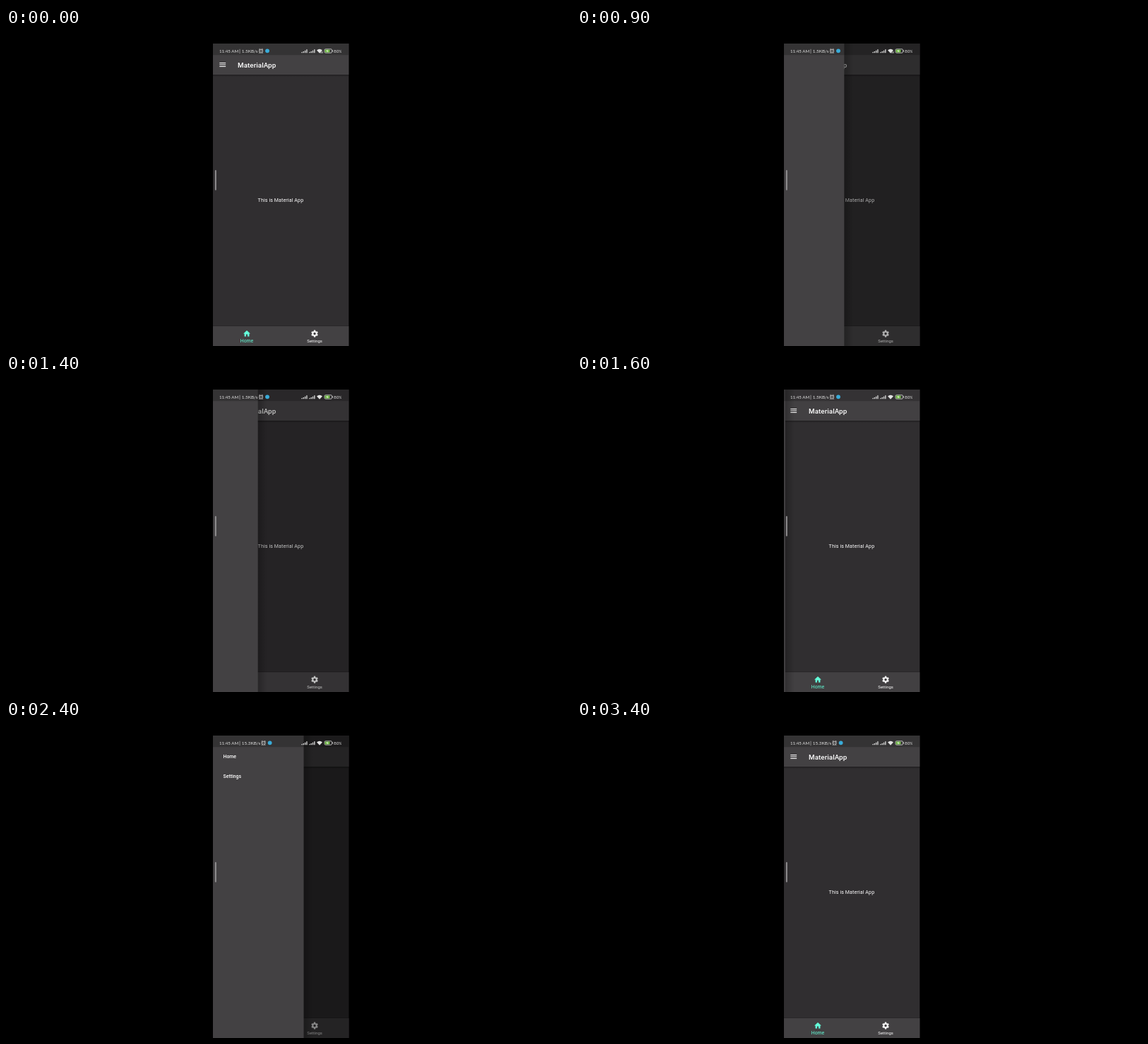
These frames come from a looping animation (800 by 450 pixels, 3500 ms). An HTML page:

```html
<!DOCTYPE html>
<html lang="en">
<head>
<meta charset="utf-8">
<title>Navigation drawer</title>
<style>
  html, body { margin: 0; width: 100%; height: 100%; overflow: hidden; background: #000; }
  svg { display: block; width: 100vw; height: 100vh; }
  text { font-family: Roboto, sans-serif; fill: #fff; }
  .medium { font-weight: 500; }
  .status text { font-family: Lato, sans-serif; font-size: 6.4px; fill: #e2e2e2; }
</style>
</head>
<body>
<svg viewBox="0 0 800 450">
  <defs>
    <clipPath id="screen"><rect x="293" y="22" width="192.3" height="428"/></clipPath>
    <linearGradient id="edgeShade">
      <stop offset="0" stop-opacity=".25"/><stop offset="1" stop-opacity="0"/>
    </linearGradient>
    <linearGradient id="barShade" x2="0" y2="1">
      <stop offset="0" stop-opacity=".35"/><stop offset="1" stop-opacity="0"/>
    </linearGradient>
    <!-- Icons live on a 24-unit grid centred on the origin -->
    <path id="home" d="M-2 8v-6h4v6h5v-8h3L0-9-10 0h3v8z"/>
    <path id="menu" d="M-9 6h18v-2h-18zM-9 1h18v-2h-18zM-9-4h18v-2h-18z"/>
    <g id="gear">
      <circle r="5.4" fill="none" stroke="#fff" stroke-width="3.8"/>
      <g id="teeth"></g>
    </g>
    <path id="bars" d="M0 35.2v-1.2h1.4v1.2zM2.3 35.2v-2.2h1.4v2.2zM4.6 35.2v-3.5h1.4v3.5zM6.9 35.2v-5h1.4v5z"/>
  </defs>

  <rect width="800" height="450"/>
  <g clip-path="url(#screen)">
    <rect x="293" y="22" width="193" height="428" fill="#302e30"/>
    <rect x="293" y="22" width="193" height="44" fill="#434143"/>
    <rect x="293" y="66" width="193" height="3" fill="url(#barShade)"/>
    <rect x="293" y="421" width="193" height="1.2" opacity=".15"/>
    <rect x="293" y="422" width="193" height="28" fill="#434143"/>

    <use href="#menu" transform="translate(306.7 52) scale(.49)" fill="#fff"/>
    <text class="medium" x="328" y="55.6" font-size="9.8" letter-spacing=".07">MaterialApp</text>
    <text x="356.6" y="246.4" font-size="7" letter-spacing=".14">This is Material App</text>

    <use href="#home" transform="translate(341 432.5) scale(.49)" fill="#64ffda"/>
    <text x="341" y="444.6" font-size="6.86" text-anchor="middle" style="fill:#64ffda">Home</text>
    <use href="#gear" transform="translate(437 432.5) scale(.49)"/>
    <text x="437" y="444.6" font-size="5.88" text-anchor="middle">Settings</text>

    <rect id="scrim" x="293" y="22" width="193" height="428"/>

    <g id="drawer">
      <rect x="441.9" y="22" width="13" height="428" fill="url(#edgeShade)"/>
      <rect x="293" y="22" width="148.9" height="428" fill="#434143"/>
      <use href="#home" transform="translate(306.7 51.8) scale(.49)" fill="#fff"/>
      <text class="medium" x="328" y="54.3" font-size="6.86">Home</text>
      <use href="#gear" transform="translate(306.7 79.3) scale(.49)"/>
      <text class="medium" x="328" y="81.8" font-size="6.86">Settings</text>
    </g>

    <rect x="293" y="22" width="193" height="16.3" opacity=".22"/>
    <g class="status">
      <text x="302" y="35.2" style="font-size:6.2px">11:45 AM</text>
      <path d="M331 29.8v6.4" stroke="#d0d0d0" stroke-width=".6"/>
      <text id="speed" x="333.8" y="35.2"></text>
      <g id="notices">
        <circle cx="361" cy="32.7" r="2.5" fill="none" stroke="#e2e2e2" stroke-width=".9"/>
        <path d="M358 30.6l1.6-1.4M364 30.6l-1.6-1.4M359.2 35l-.8.9M362.8 35l.8.9M360 32.2l1 1 1-1"
              fill="none" stroke="#e2e2e2" stroke-width=".8"/>
        <circle cx="370" cy="32.3" r="2.9" fill="#39abd8"/>
      </g>
      <use href="#bars" x="418.3" fill="#d4d4d4"/>
      <use href="#bars" x="429.2" fill="#d4d4d4"/>
      <path d="M440 31.4Q444 27.9 448 31.4L444 35.7z" fill="#e2e2e2"/>
      <path id="traffic" d="M446 35.8v-2.6M448 33.2v2.6" stroke="#e2e2e2" stroke-width=".9"/>
      <rect x="451" y="29.8" width="10.4" height="5.4" rx="1.4" fill="none" stroke="#d8d8d8" stroke-width=".8"/>
      <rect x="451.6" y="30.4" width="6.8" height="4.2" rx=".8" fill="#78c24c"/>
      <path d="M455.3 30.2l-1.7 2.6h1.4l-.4 2 1.8-2.6h-1.4z" fill="#fff"/>
      <path d="M462.4 31.4v2.2" stroke="#d8d8d8" stroke-width=".9"/>
      <text x="464" y="35.2">80<tspan font-size="4.7">%</tspan></text>
    </g>

    <rect x="295.9" y="201" width="1.9" height="28.6" rx=".9" fill="#949294"/>
  </g>
</svg>
<script>
  const LOOP = 3500, FRAME = 100, DRAWER_WIDTH = 148.9;
  const MOVES = [
    { at: 816, open: true }, { at: 1316, open: false },
    { at: 2246, open: true }, { at: 2833, open: false },
  ];
  const byId = id => document.getElementById(id);
  const drawer = byId('drawer'), scrim = byId('scrim');
  const speed = byId('speed'), notices = byId('notices'), traffic = byId('traffic');

  byId('teeth').innerHTML = Array.from({ length: 6 }, (_, i) =>
    `<path d="M-2.9-6.2L-2.1-10H2.1L2.9-6.2z" fill="#fff" transform="rotate(${i * 60})"/>`).join('');

  // Critically damped spring from 0 to 1, launched with unit velocity
  function fling(ms) {
    const t = ms / 1000, omega = Math.sqrt(500);
    const x = 1 - (1 + (omega - 1) * t) * Math.exp(-omega * t);
    return x > 0.997 ? 1 : x;
  }

  function openness(ms) {
    const move = MOVES.filter(m => m.at <= ms).pop();
    if (!move) return 0;
    const x = fling(ms - move.at);
    return move.open ? x : 1 - x;
  }

  function render(ms) {
    const open = openness(ms);
    drawer.setAttribute('transform', `translate(${(open - 1) * DRAWER_WIDTH} 0)`);
    drawer.setAttribute('visibility', open > 0 ? 'visible' : 'hidden');
    scrim.setAttribute('opacity', open * 0.54);

    const fast = ms >= 1700;
    speed.textContent = fast ? '15.3KB/s' : '1.5KB/s';
    notices.setAttribute('transform', `translate(${fast ? 3.6 : 0} 0)`);
    traffic.setAttribute('visibility', ms < 1300 ? 'visible' : 'hidden');
  }

  const start = performance.now();
  function tick() {
    const ms = (performance.now() - start) % LOOP;
    render(Math.floor(ms / FRAME) * FRAME);
    requestAnimationFrame(tick);
  }
  tick();
</script>
</body>
</html>
```
